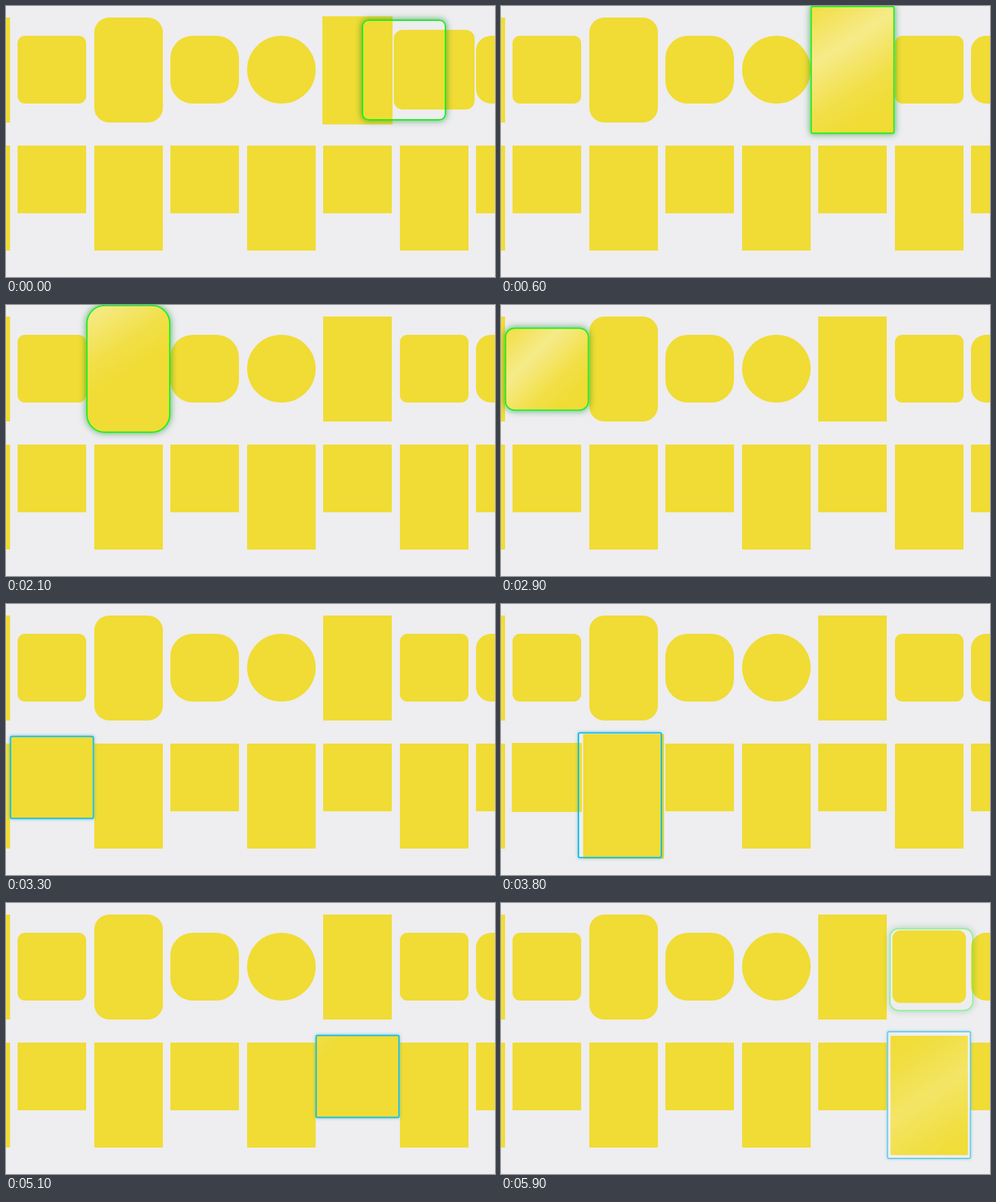
Recreate the animation shown at these times as an HTML page. Size 720 px wide and 400 px high, loop 6 s.

```html
<!DOCTYPE html>
<html lang="en">
<head>
<meta charset="utf-8">
<title>Focus border</title>
<style>
  html, body { margin: 0; width: 100%; height: 100%; overflow: hidden; background: #eeedf0; }
  #stage { position: relative; width: 720px; height: 400px; overflow: hidden; }
  .item { position: absolute; background: #f0dc34; }
  .focus { position: absolute; left: 0; top: 0; box-sizing: border-box; overflow: hidden; border: 2px solid; }
  .green { border-color: #16f01c; box-shadow: 0 0 10px 1px rgba(0, 135, 35, .55); }
  .cyan { border-color: #14bce0; box-shadow: 0 0 4px rgba(20, 170, 210, .6); }
  .shimmer { position: absolute; inset: 0; }
</style>
</head>
<body>
<div id="stage"></div>
<script>
const LOOP = 6000, MOVE = 240, SHIMMER = 1000, ZOOM = 0.2;
const PITCH = 112.5, WIDTH = 101, SQUARE = 100, TALL = 155.5;
const stage = document.getElementById('stage');

// Focus stops: start time, row, column
const stops = [
  [-900, 0, 6], [-52, 0, 5], [620, 0, 4], [1060, 0, 3], [1595, 0, 2], [2246, 0, 1],
  [3030, 1, 1], [3612, 1, 2], [3990, 1, 3], [4372, 1, 4], [4770, 1, 5], [5160, 1, 6],
  [5803, 0, 6]
].map(([time, row, col]) => ({ time, row, col }));

const topRadii = [0, 11, 22, 33, 50.5, 0, 11, 22];
const topTall = [0, 2, 5];

function add(className, parent = stage) {
  const el = document.createElement('div');
  el.className = className;
  return parent.appendChild(el);
}

function makeItem(row, col) {
  const tall = row ? col % 2 === 0 : topTall.includes(col);
  const h = tall ? TALL : SQUARE;
  const x = 17 + PITCH * (col - 1);
  const y = row ? 205.7 : 94.4 - h / 2;
  const radius = row ? 1 : topRadii[col];
  const el = add('item');
  Object.assign(el.style, {
    left: x + 'px', top: y + 'px', width: WIDTH + 'px', height: h + 'px', borderRadius: radius + 'px'
  });
  return { el, cx: x + WIDTH / 2, cy: y + h / 2, h, radius };
}

const rows = [0, 1].map(row => topRadii.map((_, col) => makeItem(row, col)));
const borders = ['green', 'cyan'].map(color => {
  const el = add('focus ' + color);
  return { el, shimmer: add('shimmer', el) };
});

const clamp = v => Math.min(1, Math.max(0, v));
const smooth = x => (1 - Math.cos(Math.PI * x)) / 2;
const decelerate = x => 1 - (1 - x) ** 2;
const itemAt = stop => rows[stop.row][stop.col];

function frameOf({ cx, cy, h, radius }) {
  const w = WIDTH * (1 + ZOOM) + 2.5;
  const fh = h * (1 + ZOOM) + 2.5;
  return [cx - w / 2, cy - fh / 2, w, fh, Math.max(3, radius * (1 + ZOOM) + 1)];
}

function drawShimmer(el, age, w, h) {
  const p = -1 + 2 * age / SHIMMER;
  if (age < 0 || p > 1) {
    el.style.background = 'none';
    return;
  }
  const bands = [[0, 0], [.2, .1], [.5, .42], [.8, .1], [1, 0]]
    .map(([at, alpha]) => `rgba(255,255,255,${alpha}) ${(at + p) * 100}%`);
  el.style.background = `linear-gradient(${Math.PI / 2 + Math.atan2(h, w)}rad, ${bands})`;
}

function drawBorder(row, t, prev, cur, x) {
  const { el, shimmer } = borders[row];
  const arriving = cur.row === row, leaving = prev.row === row;
  el.style.display = arriving || (leaving && x < 1) ? 'block' : 'none';
  if (!arriving && !leaving) return;

  const stop = arriving ? cur : prev;
  const end = frameOf(itemAt(stop));
  let start = end;
  if (arriving && leaving) start = frameOf(itemAt(prev));
  else if (arriving) start = end.map((v, i) => v + (i < 2 ? 10 : 0));

  const p = decelerate(x);
  const [left, top, w, h, radius] = end.map((v, i) => start[i] + (v - start[i]) * p);
  Object.assign(el.style, {
    transform: `translate(${left}px, ${top}px)`,
    width: w + 'px', height: h + 'px', borderRadius: radius + 'px',
    opacity: arriving && leaving ? 1 : arriving ? x : 1 - x
  });
  drawShimmer(shimmer, t - stop.time - MOVE, w, h);
}

function draw(t) {
  const k = stops.findLastIndex(s => s.time <= t);
  const prev = stops[k - 1], cur = stops[k];
  const x = clamp((t - cur.time) / MOVE);
  const grown = smooth(x);
  rows.flat().forEach(item => {
    const amount = item === itemAt(cur) ? grown : item === itemAt(prev) ? 1 - grown : 0;
    item.el.style.transform = amount ? `scale(${1 + ZOOM * amount})` : 'none';
  });
  [0, 1].forEach(row => drawBorder(row, t, prev, cur, x));
}

const began = performance.now();
function tick() {
  draw((performance.now() - began) % LOOP);
  requestAnimationFrame(tick);
}
tick();
</script>
</body>
</html>
```
